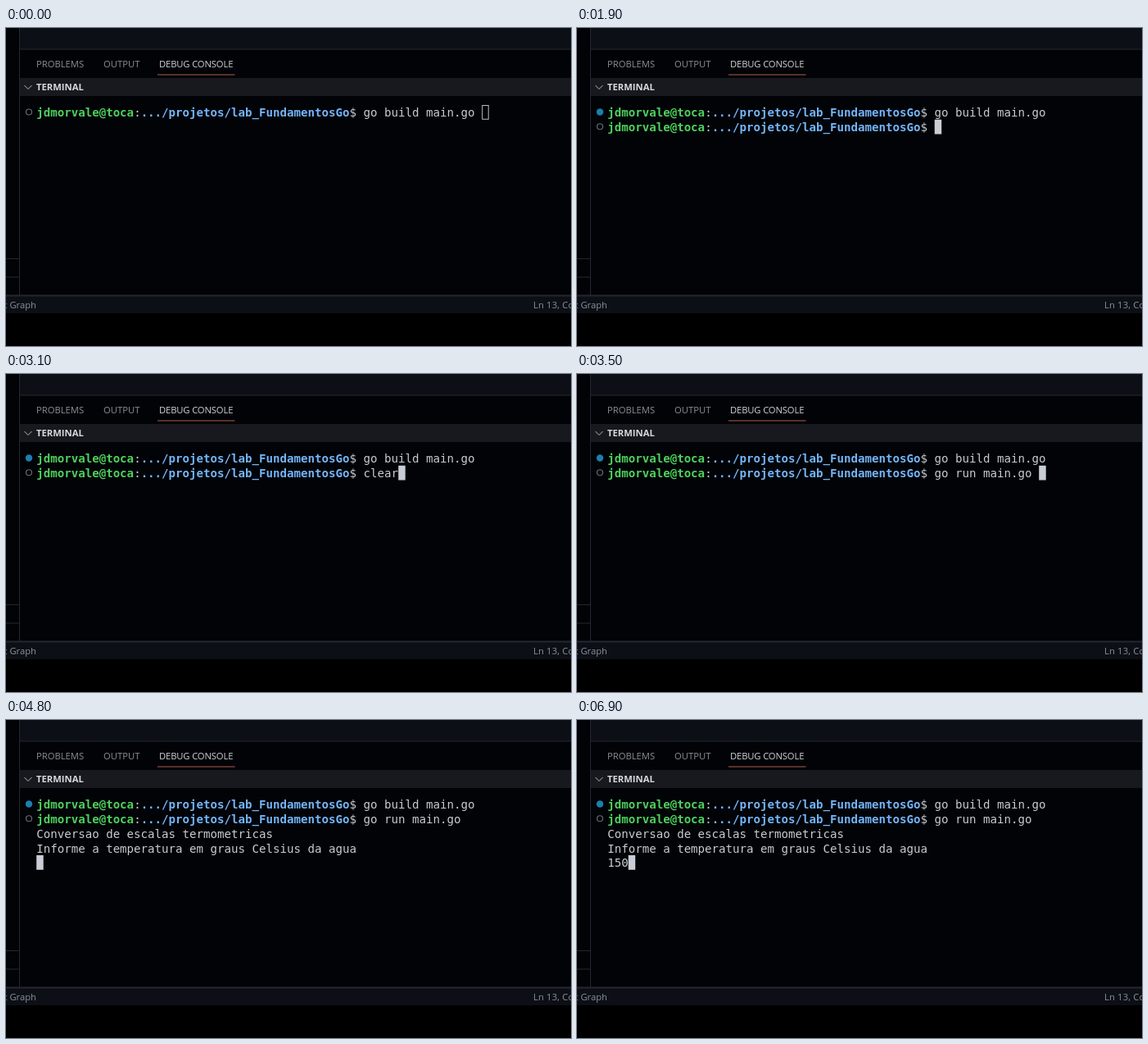
Recreate the animation shown at these times as an HTML page. Size 690 px wide and 388 px high, loop 8000 ms.

```html
<!DOCTYPE html>
<html lang="pt">
<head>
<meta charset="utf-8">
<title>Terminal</title>
<style>
  html, body { margin: 0; width: 100%; height: 100%; overflow: hidden; background: #000; }
  svg { display: block; width: 100vw; height: 100vh; }
  text { white-space: pre; }
  .ui { font: 11.25px "Open Sans", "Noto Sans", sans-serif; fill: #8b9199; }
  .ui .active { fill: #cfd4da; }
  .ui .title { fill: #d6dade; font-weight: 700; }
  .term { font: 14.12px "DejaVu Sans Mono", monospace; fill: #c9cccf; }
  .user { fill: #4fd05c; font-weight: 700; }
  .path { fill: #74b5f8; font-weight: 700; }
  .edge { fill: #24282e; }
</style>
</head>
<body>
<svg viewBox="0 0 690 388" xmlns="http://www.w3.org/2000/svg">
  <rect width="690" height="348" fill="#010307"/>
  <rect x="17" width="673" height="26" fill="#0c0f16"/>
  <rect x="17" y="61" width="673" height="22" fill="#17191e"/>
  <rect y="326" width="690" height="22" fill="#0c0f16"/>
  <g class="edge">
    <rect x="17" y="25.5" width="673" height="1"/>
    <rect x="16" width="1" height="326"/>
    <rect y="281" width="16" height="1"/>
    <rect y="303.5" width="16" height="1"/>
    <rect y="325.5" width="690" height="2"/>
  </g>
  <rect x="185" y="56.5" width="94.5" height="1" fill="#b45f50"/>
  <path d="M22.5 70l4.5 4.5 4.5-4.5" fill="none" stroke="#b4b8bd"/>
  <g class="ui">
    <text x="37" y="48.3">PROBLEMS</text>
    <text x="119" y="48.3">OUTPUT</text>
    <text class="active" x="187" y="48.3" letter-spacing="-.15">DEBUG CONSOLE</text>
    <text class="title" x="37" y="76">TERMINAL</text>
    <text x="37" y="341.5" text-anchor="end">t Graph</text>
    <text x="644" y="341.5" letter-spacing=".15">Ln 13, Col 1</text>
  </g>
  <g id="rows" class="term"></g>
  <g id="marks"></g>
  <rect id="cursor"/>
</svg>
<script>
  const LOOP = 8000, LEFT = 37.2, TOP = 94, CELL = 8.5, PITCH = 17.75;
  const USER = 'jdmorvale@toca', PATH = '.../projetos/lab_FundamentosGo';
  const PROMPT_LENGTH = USER.length + PATH.length + 3;

  const prompt = command => ({ command });
  const build = prompt('go build main.go ');
  const run = prompt('go run main.go ');
  const greeting = ['Conversao de escalas termometricas',
                    'Informe a temperatura em graus Celsius da agua'];
  const answer = typed => [build, run, ...greeting, typed];

  // Start time and visible rows; the cursor follows the last row.
  const states = [
    [0, [build]],
    [900, [build]],
    [1600, [build, '']],
    [1900, [build, prompt('')]],
    [2400, [build, build]],
    [2800, [build, prompt('clear')]],
    [3400, [build, run]],
    [4600, [build, run, '']],
    [4800, answer('')],
    [6300, answer('1')],
    [6500, answer('15')],
    [6900, answer('150')]
  ];

  const rowsEl = document.getElementById('rows');
  const marksEl = document.getElementById('marks');
  const cursor = document.getElementById('cursor');
  const isPrompt = row => typeof row === 'object';
  const setAll = (el, attrs) => {
    for (const key in attrs) el.setAttribute(key, attrs[key]);
  };

  function rowMarkup(row, i) {
    const content = isPrompt(row)
      ? `<tspan class="user">${USER}</tspan>:<tspan class="path">${PATH}</tspan>$ ${row.command}`
      : row;
    return `<text x="${LEFT}" y="${TOP + 14.3 + i * PITCH}">${content}</text>`;
  }

  function markMarkup(row, i, prompts) {
    const done = i < prompts.length - 1;
    const paint = done ? 'r="4.2" fill="#1d7fae"'
                       : 'r="3.5" fill="none" stroke="#686c70" stroke-width="1.2"';
    return `<circle cx="28" cy="${102.5 + i * PITCH}" ${paint}/>`;
  }

  function show(index) {
    const rows = states[index][1];
    const last = rows[rows.length - 1];
    const column = isPrompt(last) ? PROMPT_LENGTH + last.command.length : last.length;
    const inset = index === 0 ? 0.5 : 0;
    rowsEl.innerHTML = rows.map(rowMarkup).join('');
    marksEl.innerHTML = rows.filter(isPrompt).map(markMarkup).join('');
    setAll(cursor, {
      x: LEFT + column * CELL + inset,
      y: TOP + (rows.length - 1) * PITCH + inset,
      width: CELL - 2 * inset,
      height: PITCH - 2 * inset,
      fill: inset ? 'none' : '#c9cdd5',
      stroke: inset ? '#b9bdc4' : 'none'
    });
  }

  let shown = -1;
  const start = performance.now();
  function tick() {
    const time = (performance.now() - start) % LOOP;
    const index = states.findLastIndex(([from]) => from <= time);
    if (index !== shown) show(shown = index);
    requestAnimationFrame(tick);
  }
  tick();
</script>
</body>
</html>
```
